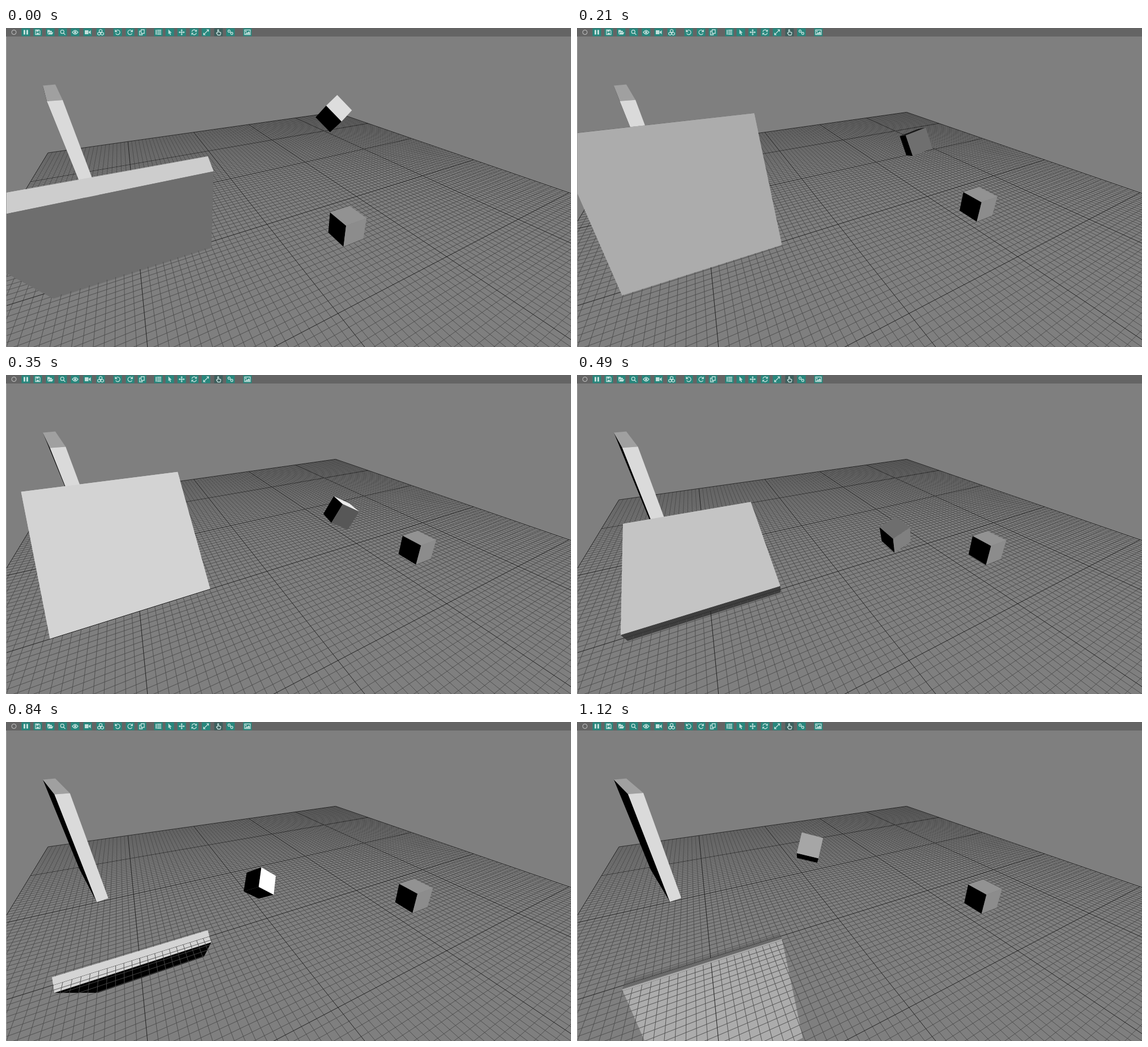
Recreate the animation shown at these times as an HTML page with a canvas. Size 997 by 562 pixels, loop 1.19 s.

```html
<!DOCTYPE html>
<html lang="en">
<head>
<meta charset="utf-8">
<title>Tumbling boxes</title>
<style>
  html, body { margin: 0; width: 100%; height: 100%; overflow: hidden; background: #7f7f7f; }
  canvas, svg { position: absolute; left: 0; top: 0; display: block; }
  .tile { fill: #27877d; }
  .tile.on { fill: #3c5f5d; }
  .line { fill: none; stroke: #c3dfdb; stroke-width: 1.3; }
  .solid { fill: #c3dfdb; }
</style>
</head>
<body>
<canvas id="stage" width="997" height="562"></canvas>
<svg id="bar" width="997" height="16" viewBox="0 0 997 16">
  <rect width="997" height="15" fill="#646464"/>
  <circle cx="14" cy="7.5" r="4" fill="none" stroke="#c8c8c8"/>
</svg>
<script>
const STEP = 70, STEPS = 17, W = 997, H = 562;
const ctx = document.getElementById('stage').getContext('2d');

// Toolbar: x centre, outlined path, filled path (around 0,0)
const icons = [
  [35, '', 'M-4-4h3v8h-3zM1-4h3v8h-3z'],
  [56, 'M-4-4h6.5l1.5 1.5v6.5h-8z', 'M-2.5-4h4v3h-4zM-2 1h4v3h-4z'],
  [78, '', 'M-5-4h4l1 1.5h3v2h-6l-2 4.5zM-2 0h7.5l-2 4h-7.5z'],
  [100, 'M2.3-.8a3 3 0 1 1-6 0a3 3 0 1 1 6 0M1.5 1.5l3 3', ''],
  [122, 'M-5 0q5-6.5 10 0q-5 6.5-10 0z', 'M-2 0a2 2 0 1 1 4 0a2 2 0 1 1-4 0'],
  [144, '', 'M-5-3.5h6.5v7h-6.5zM2-.8l3.5-2.7v7l-3.5-2.7z'],
  [167, 'M0-5l2.5 1.3v2.7l-2.5 1.3l-2.5-1.3v-2.7zM-2.8 0l2.5 1.3v2.4l-2.5 1.3l-2.5-1.3v-2.4zM2.8 0l2.5 1.3v2.4l-2.5 1.3l-2.5-1.3v-2.4z', ''],
  [197, 'M-3-2.5a4 4 0 1 1-.5 4.5', 'M-4.8-5v4.8h4.6z'],
  [219, 'M3-2.5a4 4 0 1 0 .5 4.5', 'M4.8-5v4.8h-4.6z'],
  [240, 'M-1.5-4.5h5.5v6.5h-5.5zM-1.5-2h-3v6.5h5v-2.5', ''],
  [269, 'M-2.5-3.5h7.5M-2.5-1.2h7.5M-2.5 1.2h7.5M-2.5 3.5h7.5', 'M-5-4.2h1.6v8.4h-1.6z'],
  [289, '', 'M-2.5-5l6 6h-2.8l1.5 3.3l-1.6.7l-1.5-3.3l-1.6 1.8z'],
  [310, 'M-4 0h8M0-4v8', 'M0-5.5l2 2.5h-4zM0 5.5l2-2.5h-4zM-5.5 0l2.5 2v-4zM5.5 0l-2.5 2v-4z'],
  [332, 'M-4-.8a4 4 0 0 1 7-2M4 .8a4 4 0 0 1-7 2', 'M4.8-5v4h-4zM-4.8 5v-4h4z'],
  [353, 'M-3 3l6-6', 'M5-5v4.5l-4.5-4.5zM-5 5v-4.5l4.5 4.5z'],
  [375, 'M-1.5 1v-5q1-1.2 1.8 0v3.5l3.5.8v2.7l-1 2h-4l-2.5-3.5q.5-1.5 2.2-.5', '', true],
  [396, 'M-4.3-2a2 2 0 1 1 4 0a2 2 0 1 1-4 0M.3 2a2 2 0 1 1 4 0a2 2 0 1 1-4 0M-1-.8l2 1.8', ''],
  [426, 'M-5-4h10v8h-10z', 'M-4 3l2.5-3l1.5 1.2l2-3l2 2.5v2.3zM-3.5-2.5h2v2h-2z']
];
document.getElementById('bar').innerHTML += icons.map(([x, line, solid, on]) =>
  `<g transform="translate(${x} 7.5)"><rect class="tile${on ? ' on' : ''}" x="-7.5" y="-7" width="15" height="14"/>` +
  `<path class="line" d="${line}"/><path class="solid" d="${solid}"/></g>`).join('');

// Vectors
const { sin, cos, PI } = Math;
const rad = PI / 180;
const scale = (a, k) => a.map(v => v * k);
const add = (a, b, k = 1) => a.map((v, i) => v + b[i] * k);
const dot = (a, b) => a.reduce((sum, v, i) => sum + v * b[i], 0);
const cross = ([a, b, c], [x, y, z]) => [b * z - c * y, c * x - a * z, a * y - b * x];
const mix = (a, b, t) => a.map((v, i) => v + (b[i] - v) * t);
const turn = (v, axis, a) =>
  add(add(scale(v, cos(a)), cross(axis, v), sin(a)), axis, dot(axis, v) * (1 - cos(a)));

// Camera: x right, y down, z forward; the floor starts at its far left corner
const FOCAL = 486.7, CX = W / 2, CY = H / 2;
const pitch = 28.55 * rad, yaw = 28.5 * rad;
const ahead = [0, -sin(pitch), cos(pitch)];
const UP = [0, -cos(pitch), -sin(pitch)];
const ALONG = add([cos(yaw), 0, 0], ahead, sin(yaw));
const NEAR = add([sin(yaw), 0, 0], ahead, -cos(yaw));
const project = ([x, y, z]) => [CX + x / z * FOCAL, CY + y / z * FOCAL];
const place = (x, y, z) => [(x - CX) / FOCAL * z, (y - CY) / FOCAL * z, z];
const CORNER = place(74, 220, 3.87);
const floor = (u, v) => add(add(CORNER, ALONG, u), NEAR, v);
const height = p => dot(add(p, CORNER, -1), UP);

// One lamp, up and to the right behind the viewer
const LAMP = [0.84, -0.42, -0.42];
const light = normal => Math.max(0, Math.min(255, 300 * dot(normal, LAMP) - 25));

function fill(points, shade) {
  ctx.beginPath();
  points.forEach(p => ctx.lineTo(p[0], p[1]));
  ctx.closePath();
  const v = Math.round(shade);
  ctx.fillStyle = `rgb(${v},${v},${v})`;
  ctx.fill();
}

// Keep the part of a polygon or segment where side(p) >= 0
function cut(points, side) {
  const out = [];
  points.forEach((p, i) => {
    const q = points[(i + 1) % points.length], a = side(p), b = side(q);
    if (a >= 0) out.push(p);
    if (a * b < 0) out.push(mix(p, q, a / (a - b)));
  });
  return out;
}

// Visible faces of a box; glow is the least shade of its third axis' front
function box(centre, axes, size, glow = 0) {
  const half = axes.map((axis, n) => scale(axis, size[n] / 2));
  const faces = [];
  for (let n = 0; n < 3; n++) {
    for (const sign of [-1, 1]) {
      const normal = scale(axes[n], sign), mid = add(centre, half[n], sign);
      if (dot(normal, mid) >= 0) continue;
      const p = half[(n + 1) % 3], q = half[(n + 2) % 3];
      const points = [[-1, -1], [1, -1], [1, 1], [-1, 1]].map(([a, b]) => add(add(mid, p, a), q, b));
      const least = n === 2 && sign > 0 ? glow : 0;
      faces.push({ points, shade: Math.max(least, light(normal)) });
    }
  }
  return faces;
}
function drawFaces(faces, aboveFloor) {
  for (const { points, shade } of faces) {
    const part = aboveFloor ? cut(points, height) : points;
    if (part.length > 2) fill(part.map(project), shade);
  }
}

// The floor grid never changes, so it is drawn once
const CELLS = 5, MINOR = 20;
const grid = document.createElement('canvas');
grid.width = W;
grid.height = H;
const g = grid.getContext('2d');
function gridLines(major) {
  g.strokeStyle = major ? '#222' : '#4c4c4c';
  g.lineWidth = major ? 1 : 0.9;
  for (const flip of [false, true]) {
    g.beginPath();
    for (let i = 0; i <= CELLS * MINOR; i++) {
      if ((i % MINOR === 0) !== major) continue;
      const k = i / MINOR;
      const ends = flip ? [floor(0, k), floor(CELLS, k)] : [floor(k, 0), floor(k, CELLS)];
      const seg = cut(ends, p => p[2] - 0.1);
      if (seg.length < 2) continue;
      g.moveTo(...project(seg[0]));
      g.lineTo(...project(seg[1]));
    }
    g.stroke();
  }
}
gridLines(false);
gridLines(true);

// Slab turning steadily about a hinge on the floor
function slab(s) {
  const length = 0.99, a = (119.4 - 13.85 * s) * rad;
  const arm = add(scale(UP, sin(a)), NEAR, -cos(a));
  const out = add(scale(UP, cos(a)), NEAR, sin(a));
  return box(add(floor(1, 3), arm, length / 2), [ALONG, arm, out], [1, length, 0.1], 110);
}

// Post turning slowly about its far edge
function drawPost(s) {
  const t = s / (STEPS - 1);
  const topA = [65, 101.5], topB = [87, 99.5], foot = [130, 260];
  const topC = mix([100, 127], [117, 125], t), topD = mix([72, 129], [90, 127], t);
  const footC = mix([170, 312], [184, 310], t), footD = mix([149, 319], [164, 317], t);
  fill([topA, topD, footD, foot], 0);
  fill([topA, topB, topC, topD], 160);
  fill([topD, topC, footC, footD], 218);
}

// Cube swinging on a round path while it spins about a fixed axis
const CUBE = [0.2, 0.2, 0.2];
const SPIN = [0.56, 0.12, -0.82];
const poseA = [-0.81, 0.51, -0.29], poseB = [0.16, 0.67, 0.72];
const pose = [poseA, poseB, cross(poseA, poseB)];
function tumbler(s) {
  const t = s / (STEPS - 1);
  const a = (198 * t - 32 - 5 * sin(2 * PI * t)) * rad;
  const r = 92 + 10 * sin(PI * t);
  const axes = pose.map(v => turn(v, SPIN, 24.7 * rad * (s - 7)));
  return box(place(500 + r * cos(a), 200 + r * sin(a), 2.63), axes, CUBE);
}

// Cube sliding along the floor: slows to a stop, then drifts back
function slider(s) {
  const left = Math.max(0, 1 - s / 5), back = Math.max(0, s - 5);
  const u = 3.32 - 0.82 * left * left - 0.0064 * back;
  return box(add(floor(u, 3.447), UP, 0.1), [ALONG, NEAR, UP], CUBE);
}

function draw() {
  const s = Math.floor(performance.now() / STEP) % STEPS;
  ctx.fillStyle = '#7f7f7f';
  ctx.fillRect(0, 0, W, H);
  const faces = slab(s);
  drawFaces(faces);
  ctx.drawImage(grid, 0, 0);
  drawPost(s);
  drawFaces(faces, true);
  drawFaces(tumbler(s));
  drawFaces(slider(s));
  ctx.fillStyle = '#a2a2a2';
  ctx.fillRect(0, 15, 1, H);
  requestAnimationFrame(draw);
}
draw();
</script>
</body>
</html>
```
